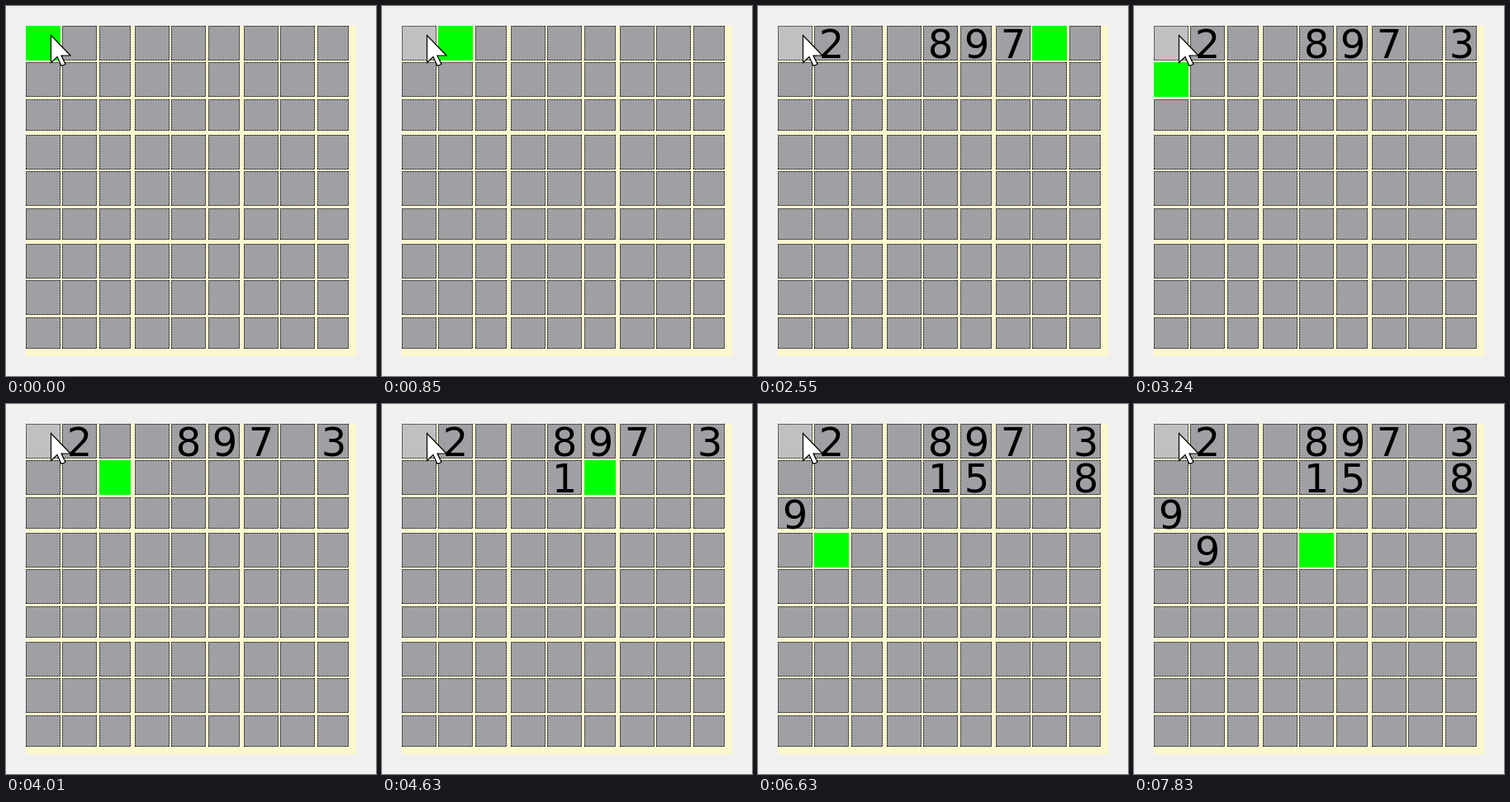
Write an HTML page with a canvas that moves like this. It is 448 px wide and 448 px high and loops after 8000 ms.

```html
<!DOCTYPE html>
<html lang="en">
<head>
<meta charset="utf-8">
<title>Grid entry</title>
<style>
html, body { margin: 0; width: 100%; height: 100%; overflow: hidden; background: #f0f0ee; }
canvas { display: block; }
</style>
</head>
<body>
<canvas id="stage" width="448" height="448"></canvas>
<script>
const ctx = document.getElementById('stage').getContext('2d');
const LOOP = 8000;
const PITCH = 44;

// [time, active cell], cells counted row by row
const steps = [
  [0, 0], [850, 1], [920, 2], [1150, 3], [1470, 4], [1860, 5], [1940, 6],
  [2550, 7], [2780, 8], [3240, 9], [3840, 10], [4010, 11], [4080, 12],
  [4250, 13], [4630, 14], [4710, 15], [4940, 16], [5090, 17], [5490, 18],
  [5920, 19], [6630, 28], [7220, 29], [7680, 30], [7830, 31]
];
// a digit shows once the active cell has moved past it
const digits = { 1: 2, 4: 8, 5: 9, 6: 7, 8: 3, 13: 1, 14: 5, 17: 8, 18: 9, 28: 9 };
const press = [300, 370];
const tip = [54, 35];
const arrow = [[0, 0], [0, 33], [7.5, 26], [12.5, 37], [17.5, 35], [12.5, 24.5], [23.5, 24.5]];

const start = i => 24 + i * PITCH + (i % 3 === 2 ? 1 : 0);
const size = i => (i % 3 === 2 ? 38 : 42);

function dotted(x, y, w, h) {
  const line = (x1, y1, x2, y2) => {
    ctx.beginPath();
    ctx.moveTo(x1, y1);
    ctx.lineTo(x2, y2);
    ctx.stroke();
  };
  ctx.strokeStyle = '#000';
  ctx.lineWidth = 1;
  ctx.setLineDash([1, 1]);
  line(x, y + 0.5, x + w, y + 0.5);
  line(x, y + h - 0.5, x + w, y + h - 0.5);
  line(x + 0.5, y, x + 0.5, y + h);
  line(x + w - 0.5, y, x + w - 0.5, y + h);
  ctx.setLineDash([]);
}

function drawCell(n, active) {
  const col = n % 9, row = Math.floor(n / 9);
  const box = [start(col), start(row), size(col), size(row)];
  ctx.fillStyle = n === active ? '#00ff00' : n === 0 ? '#c0c0c0' : '#a0a0a4';
  ctx.fillRect(...box);
  if (n !== active) dotted(...box);
}

function drawDigit(n) {
  ctx.fillStyle = '#000';
  ctx.font = '48px "DejaVu Sans", sans-serif';
  ctx.textAlign = 'center';
  ctx.fillText(digits[n], 45 + (n % 9) * PITCH, 63 + Math.floor(n / 9) * PITCH);
}

function ring(r, color) {
  ctx.beginPath();
  ctx.arc(tip[0], tip[1], r, 0, Math.PI * 2);
  ctx.strokeStyle = color;
  ctx.lineWidth = 1;
  ctx.stroke();
}

function drawPointer() {
  ctx.beginPath();
  arrow.forEach(([x, y]) => ctx.lineTo(tip[0] + x + 0.5, tip[1] + y + 0.5));
  ctx.closePath();
  ctx.fillStyle = '#fff';
  ctx.fill();
  ctx.strokeStyle = '#000';
  ctx.lineWidth = 1.2;
  ctx.stroke();
}

function draw(t) {
  let active = 0;
  for (const [time, cell] of steps) if (t >= time) active = cell;

  ctx.fillStyle = '#f0f0ee';
  ctx.fillRect(0, 0, 448, 448);
  ctx.fillStyle = '#fcf8cd';
  ctx.fillRect(24, 24, 400, 400);
  for (let n = 0; n < 81; n++) drawCell(n, active);
  for (const n in digits) if (+n < active) drawDigit(+n);
  if (t >= press[0] && t < press[1]) {
    ring(26.5, '#000');
    ring(25.5, '#fff');
  }
  drawPointer();
}

const t0 = performance.now();
function tick() {
  draw((performance.now() - t0) % LOOP);
  requestAnimationFrame(tick);
}
tick();
</script>
</body>
</html>
```
